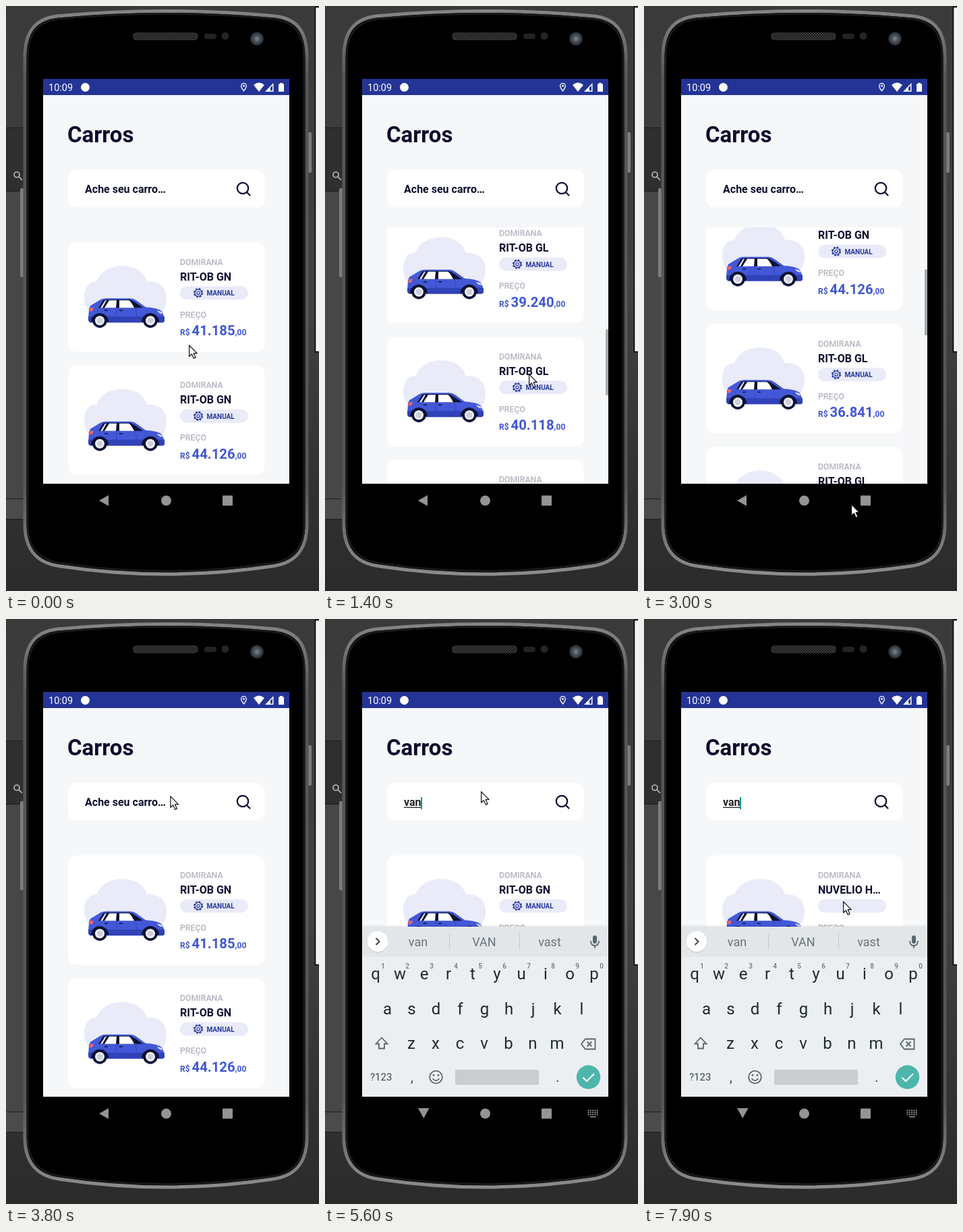
Animation of 464 by 867 pixels, one loop 8000 ms. Source, as an HTML page:

```html
<!DOCTYPE html>
<html lang="pt-BR">
<head>
<meta charset="utf-8">
<title>Carros</title>
<style>
  html, body { margin: 0; width: 100%; height: 100%; overflow: hidden; background: #2d2d2d; }
  svg { display: block; width: 100%; height: 100%; }
  text { font-family: Roboto, sans-serif; }
  .b { font-weight: 700; }
  .m { font-weight: 500; }
  .ink { fill: #0b0f2d; }
  .price { fill: #4157d2; }
  .label { fill: #b3b4bf; font-size: 12.3px; }
  .mid { text-anchor: middle; }
  .line { fill: none; stroke: #59666d; stroke-width: 1.8; }
</style>
</head>
<body>
<svg viewBox="0 0 464 867">
  <defs>
    <linearGradient id="bg" x2="0" y2="1">
      <stop offset="0" stop-color="#3a3a3a"/><stop offset=".5" stop-color="#414141"/>
      <stop offset=".86" stop-color="#303030"/><stop offset="1" stop-color="#2b2b2b"/>
    </linearGradient>
    <linearGradient id="rim" x2="0" y2="1">
      <stop offset="0" stop-color="#858585"/><stop offset=".12" stop-color="#565656"/>
      <stop offset=".85" stop-color="#565656"/><stop offset="1" stop-color="#8c8c8c"/>
    </linearGradient>
    <radialGradient id="lens">
      <stop offset="0" stop-color="#7b8791"/><stop offset=".5" stop-color="#48525b"/><stop offset="1" stop-color="#25292d"/>
    </radialGradient>
    <pattern id="mesh" width="4" height="4" patternUnits="userSpaceOnUse">
      <rect width="4" height="4" fill="#161616"/><circle cx="1" cy="1" r=".9" fill="#505050"/><circle cx="3" cy="3" r=".9" fill="#505050"/>
    </pattern>
    <clipPath id="view"><rect x="55" y="328" width="365" height="380"/></clipPath>
    <clipPath id="app"><rect x="55" y="132" width="365" height="576"/></clipPath>

    <g id="car">
      <path fill="#e9ebf9" d="M116 81C116 66 123 58 134 58C140 43 154 35 172 35C191 35 204 43 209 58C228 57 238 67 238 83C238 98 231 107 219 107H134C122 104 116 95 116 81Z"/>
      <path fill="#4358d7" d="M123 99L125 94L140 85Q143 83 149 83H184Q189 83 193 86L207 96Q225 97 231 102L234 109V115Q234 118 230 118H126Q122 118 122 114Z"/>
      <path fill="#0c1233" d="M137 97L144 86Q145 85 148 85H184Q188 86 203 97Z"/>
      <path fill="#fff" d="M146 97L153 86H164L163 97ZM168 97V86H182Q185 87 190 97Z"/>
      <path fill="#e9ebf9" d="M140 97L147 86H149L143 97Z"/>
      <path fill="#2f42b8" d="M122 110H235V117Q234 119 230 119H125Q122 118 122 114Z"/>
      <path fill="none" stroke="#3346be" d="M164 98V116M192 98L195 116"/>
      <path stroke="#0c1233" stroke-width="1.4" d="M168 101h5M146 101h5"/>
      <path fill="#f26665" d="M125 97h5l-2 5h-5z"/>
      <path fill="#cfd5fb" d="M224 101l7 2 1 3q-6 0-8-5z"/>
      <path fill="#0c1233" d="M126 118a13 13 0 0 1 26 0zM201 118a13 13 0 0 1 26 0z"/>
      <g fill="#0c1233"><circle cx="139" cy="116" r="10.7"/><circle cx="214" cy="116" r="10.7"/></g>
      <g fill="#f0f1f7"><circle cx="139" cy="116" r="7"/><circle cx="214" cy="116" r="7"/></g>
      <g fill="#cdd0dc"><circle cx="139" cy="116" r="4.4"/><circle cx="214" cy="116" r="4.4"/></g>
    </g>
    <g id="gear" fill="none" stroke="#2c3ca3">
      <circle r="6.2" stroke-width="1.9" stroke-dasharray="2.7 2.17"/>
      <circle r="5" stroke-width="1.3"/><circle r="2.2" stroke-width="1.2"/>
    </g>
  </defs>

  <!-- desktop -->
  <rect width="464" height="867" fill="url(#bg)"/>
  <rect y="180" width="30" height="95" fill="#2f2f2f"/>
  <rect y="274" width="30" height="456" fill="#474747"/>
  <path stroke="#1d1d1d" d="M0 180.500H30M0 274.500H30M0 730.500H30M0 760.500H30"/>
  <rect y="731" width="30" height="29" fill="#4b4b4b"/>
  <g fill="none" stroke="#b9b9b9" stroke-width="1.7"><circle cx="16" cy="250" r="4"/><path d="M19 253l5 5"/></g>
  <rect x="458.500" y="1.500" width="10" height="511" fill="#f4f4f4" stroke="#000" stroke-width="1.5"/>

  <!-- phone -->
  <rect x="21" y="270" width="6" height="132" rx="2" fill="#7d7d7d"/>
  <rect x="447" y="187" width="6" height="60" rx="2" fill="#7d7d7d"/>
  <path id="body" fill="#000" stroke="url(#rim)" stroke-width="5" d="M28 76C28 36 45 19 76 15Q237 0 399 15C430 19 446 36 446 76V768C446 805 430 825 396 830Q237 854 79 830C45 825 28 805 28 768Z"/>
  <path fill="none" stroke="#191919" stroke-width="3" d="M32 77C32 40 48 23 78 19Q237 4 397 19C427 23 442 40 442 77V767C442 802 427 821 394 826Q237 849 81 826C48 821 32 802 32 767Z"/>
  <rect x="189" y="40" width="95" height="10" rx="4" fill="url(#mesh)" stroke="#3c3c3c"/>
  <rect x="294" y="41" width="18" height="8" rx="4" fill="#222"/>
  <circle cx="325" cy="44.500" r="5.500" fill="#252525"/>
  <circle cx="372" cy="48.500" r="10" fill="url(#lens)"/>

  <!-- status bar -->
  <rect x="55" y="108" width="365" height="24.500" fill="#233496"/>
  <g fill="#fff">
    <text x="63" y="126" font-size="14.5">10:09</text>
    <circle cx="117.500" cy="120.500" r="6.500"/>
    <path fill-rule="evenodd" d="M352.500 114a4.500 4.500 0 0 1 4.500 4.500q0 3-4.500 8.500q-4.500-5.500-4.500-8.500a4.500 4.500 0 0 1 4.500-4.500zM352.500 115.300a3.200 3.200 0 0 0-3.200 3.200q0 2 3.200 6.300q3.200-4.300 3.200-6.300a3.200 3.200 0 0 0-3.200-3.200z"/>
    <circle cx="352.500" cy="118.500" r="1.400"/>
    <path d="M367 117Q375 110 383 117L375 127Z"/>
    <path fill-rule="evenodd" d="M384 127L396.500 114V127ZM392 121V125.500H395V117.800Z"/>
    <path d="M406 114h4v1.500h2v11.500h-8v-11.500h2z"/>
  </g>

  <!-- app -->
  <g clip-path="url(#app)">
    <rect x="55" y="132" width="365" height="576" fill="#f5f7f9"/>
    <text class="b ink" x="91" y="202" font-size="33">Carros</text>
    <rect x="92" y="243" width="291.500" height="55.500" rx="12" fill="#fff"/>
    <text id="query" class="b" x="117" y="277" font-size="16"></text>
    <path id="under" stroke="#222" stroke-width="1.300"/>
    <rect id="caret" y="264" width="2" height="18" fill="#0a9585"/>
    <g fill="none" stroke="#0b0f2d" stroke-width="2.200" stroke-linecap="round"><circle cx="351" cy="270" r="8.200"/><path d="M357 276l4.500 4.500"/></g>
    <g clip-path="url(#view)">
      <g id="list"></g>
      <rect id="bar" x="416" width="4" height="97.500" fill="#a9aaab"/>
    </g>
    <g id="board"></g>
  </g>

  <!-- navigation -->
  <rect x="55" y="708" width="365" height="49" fill="#000"/>
  <g fill="#949494">
    <path id="back" d="M138 733L152 725V741Z"/>
    <path id="down" d="M138 725H154.500L146.300 740Z"/>
    <circle cx="237.500" cy="733" r="7.500"/>
    <rect x="321" y="725.500" width="15" height="15" rx="1"/>
    <g id="imeKey"></g>
  </g>
  <path id="mouse" fill="#fff" stroke="#111" stroke-width="1.200" stroke-linejoin="round" d="M.6.800V17.300L4.400 13.800L7.200 20.300L10 19.100L7.200 12.700H12.200Z"/>
</svg>
<script>
const $ = id => document.getElementById(id);
const LOOP = 8000, STEP = 100, PITCH = 182.5, VIEW = 380;
const RANGE = 22 + 8 * PITCH;

const txt = (x, y, size, s, cls = '', extra = '') =>
  `<text x="${x}" y="${y}" font-size="${size}" class="${cls}" ${extra}>${s}</text>`;

// Cards: model, price, gearbox
const cars = [
  ['RIT-OB GN', '41.185', 1], ['RIT-OB GN', '44.126', 1],
  ['RIT-OB GL', '36.841', 1], ['RIT-OB GL', '39.240', 1],
  ['RIT-OB GL', '40.118', 1], ['NUVELIO H…', '38.752', 0],
  ['NUVELIO H…', '41.393', 0], ['VAN', '57.472', 1]
];

function card([model, price, manual], i) {
  const gearbox = manual
    ? '<use href="#gear" x="285" y="75"/>' + txt(297.5, 79, 10, 'MANUAL', 'b', 'fill="#26379b"') : '';
  return `<g transform="translate(0 ${350.2 + i * PITCH})">
    <rect x="92" width="291.5" height="162" rx="12" fill="#fff"/><use href="#car"/>
    <text class="m label" x="258" y="33.500">DOMIRANA</text>
    ${txt(258, 56.5, 16, model, 'b ink')}
    <rect x="258" y="65" width="101" height="20" rx="10" fill="#e9ebf9"/>${gearbox}
    <text class="m label" x="258" y="111.500">PREÇO</text>
    <text class="b price" x="258" y="138" font-size="12">R$<tspan x="275.500" font-size="20.3">${price}</tspan><tspan font-size="12">,00</tspan></text>
  </g>`;
}

function keys(row, x, y) {
  return [...row].map((c, i) => txt(x + i * 36, y, 24, c, 'mid', 'fill="#1d2a31"')).join('');
}

function buildBoard() {
  const digits = [...'1234567890'].map((d, i) => txt(86 + i * 36, 517.5, 10, d, 'mid m', 'fill="#68757b"')).join('');
  $('board').innerHTML = `
    <rect x="55" y="454" width="365" height="2" fill="#000" opacity=".06"/>
    <rect x="55" y="456" width="365" height="252" fill="#eceff1"/>
    <rect x="55" y="456" width="365" height="44.500" fill="#e3e6e9"/>
    <circle cx="78" cy="479" r="15.500" fill="#000" opacity=".1"/>
    <circle cx="78" cy="478" r="15.300" fill="#fff"/>
    <path id="chev" fill="none" stroke="#37474f" stroke-width="2"/>
    <g id="tools">
      <g class="line" stroke-width="2"><circle cx="124" cy="476" r="5.300"/><path d="M128 480l6 6"/></g>
      <path class="line" d="M172 470h12q2 0 2 2v8l-6 6h-8q-2 0-2-2v-12q0-2 2-2zM186 480h-4q-2 0-2 2v4M174 479q3 4 6 0"/>
      <path stroke="#59666d" stroke-width="2" d="M174 474v2M182 474v2"/>
      ${txt(230, 482.5, 13.5, 'GIF', 'mid b', 'fill="#59666d" letter-spacing="1"')}
      <rect x="275" y="470" width="16" height="16" fill="#707c82"/>
      <path stroke="#ccd0d3" d="M315.500 466V490"/>
      <g fill="#59666d"><circle cx="342" cy="478" r="2"/><circle cx="348" cy="478" r="2"/><circle cx="354" cy="478" r="2"/></g>
    </g>
    <g id="hints">
      <path stroke="#c5cacd" d="M184.500 466V490M288.500 466V490"/>
      ${[138, 236, 333].map(x => txt(x, 485, 18, '', 'mid hint', 'fill="#68747a"')).join('')}
    </g>
    <rect x="397" y="469" width="6" height="12" rx="3" fill="#59666d"/>
    <path class="line" d="M394 477q0 7 6 7t6-7M400 484v4"/>
    ${keys('qwertyuiop', 75, 534)}${digits}
    ${keys('asdfghjkl', 92.500, 585.5)}${keys('zxcvbnm', 128, 637)}
    <path class="line" d="M84 620.500l-8.500 9h4.500v7h8v-7h4.500z"/>
    <path class="line" d="M386 622.500h14.500v15h-14.500l-6-7.500zM388.500 626.500l7 7M395.500 626.500l-7 7"/>
    ${txt(67, 684, 15, '?123', '', 'fill="#37474f"')}
    ${txt(129, 686, 20, ',', 'mid', 'fill="#37474f"')}${txt(345, 686, 20, '.', 'mid', 'fill="#37474f"')}
    <circle class="line" cx="164.500" cy="679" r="9.300"/>
    <path class="line" d="M159.500 681q5 6 10 0"/>
    <g fill="#59666d"><circle cx="161" cy="676" r="1.500"/><circle cx="168" cy="676" r="1.500"/></g>
    <rect x="193" y="668" width="124" height="22.500" rx="2" fill="#c9cdd0"/>
    <circle cx="390.500" cy="679" r="17.700" fill="#4db6ac"/>
    <path fill="none" stroke="#fff" stroke-width="2.200" d="M382.500 679.500l5.500 5.500l11-11"/>`;
}

function buildImeKey() {
  let s = '';
  for (let r = 0; r < 3; r++)
    for (let c = 0; c < 5; c++) s += `<rect x="${389.5 + c * 3.3}" y="${727.5 + r * 3}" width="2" height="1.900"/>`;
  $('imeKey').innerHTML = s + '<rect x="393" y="737" width="9" height="1.500"/>';
}

const mousePath = [
  [100, 271, 502], [300, 283, 563], [400, 283, 563], [800, 287, 352], [900, 287, 336],
  [1300, 300, 560], [1400, 302, 545], [1700, 312, 318], [1800, 313, 298], [1900, 315, 307],
  [2100, 314, 340], [2200, 314, 340], [2400, 320, 348], [2700, 320, 348], [3000, 307, 738],
  [3100, 306, 736], [3600, 268, 276], [3900, 231, 255], [6100, 231, 255], [6300, 244, 293],
  [6800, 244, 293], [7300, 252, 626], [7400, 252, 626], [7900, 295, 418]
];
const scrollPath = [
  [400, 0], [500, 25], [800, 227], [1000, 410], [1300, 560], [1400, 590],
  [1600, 810], [1800, 1080], [1900, RANGE - VIEW], [2700, RANGE - VIEW], [3000, 244], [3100, 90], [3200, 0]
];
const barFade = [[400, 0], [500, 1], [2200, 1], [2400, 0], [2700, 0], [2800, 1], [3400, 1], [3600, 0]];
const boardRise = [[3900, 1], [4000, .7], [4100, .35], [4200, .12], [4300, 0]];
const typing = [
  [4900, 'v', ['v', 'vai', 'valor']],
  [5400, 'va', ['va', 'vai', 'validar']],
  [5600, 'van', ['van', 'VAN', 'vast']]
];

// Linear interpolation through [time, ...values] stops
function at(stops, t, k = 1) {
  if (t <= stops[0][0]) return stops[0][k];
  for (let i = 1; i < stops.length; i++) {
    const a = stops[i - 1], b = stops[i];
    if (t <= b[0]) return a[k] + (b[k] - a[k]) * (t - a[0]) / (b[0] - a[0]);
  }
  return stops[stops.length - 1][k];
}

const show = (id, on) => $(id).setAttribute('visibility', on ? 'visible' : 'hidden');
const shift = (id, x, y) => $(id).setAttribute('transform', `translate(${x} ${y})`);

$('list').innerHTML = cars.map(card).join('') + '<g id="found">' + cars.slice(6).map(card).join('') + '</g>';
buildBoard();
buildImeKey();
const all = [...$('list').children].slice(0, cars.length);
const hints = document.querySelectorAll('.hint');

function draw(t) {
  const scroll = at(scrollPath, t);
  shift('list', 0, -scroll);
  $('bar').setAttribute('y', 328 + scroll * VIEW / RANGE);
  $('bar').setAttribute('opacity', at(barFade, t));
  shift('mouse', at(mousePath, t), at(mousePath, t, 2));

  const filtered = t >= 5700;
  show('found', filtered);
  all.forEach(c => c.setAttribute('visibility', filtered ? 'hidden' : 'visible'));

  const open = t >= 4000;
  show('board', open);
  show('back', !open);
  show('down', open);
  show('imeKey', open);
  shift('board', 0, 254 * at(boardRise, t));

  const typed = typing.filter(k => t >= k[0]).pop();
  const query = $('query');
  query.textContent = typed ? typed[1] : 'Ache seu carro…';
  query.setAttribute('fill', typed ? '#222' : '#0b0f2d');
  $('chev').setAttribute('d', typed ? 'M75.500 473l5 5l-5 5' : 'M80.500 473l-5 5l5 5');
  $('tools').setAttribute('display', typed ? 'none' : 'inline');
  $('hints').setAttribute('display', typed ? 'inline' : 'none');
  $('under').setAttribute('d', '');
  const blink = typed && (t < 5700 || Math.floor((t - 5700) / 500) % 2 === 0);
  show('caret', blink);
  if (typed) {
    const end = 117 + query.getComputedTextLength();
    $('under').setAttribute('d', `M117 279.300H${end}`);
    $('caret').setAttribute('x', end - .5);
    hints.forEach((h, i) => h.textContent = typed[2][i]);
  }
}

function tick() {
  const t = performance.now() % LOOP;
  draw(Math.floor(t / STEP) * STEP);
  requestAnimationFrame(tick);
}
tick();
</script>
</body>
</html>
```
